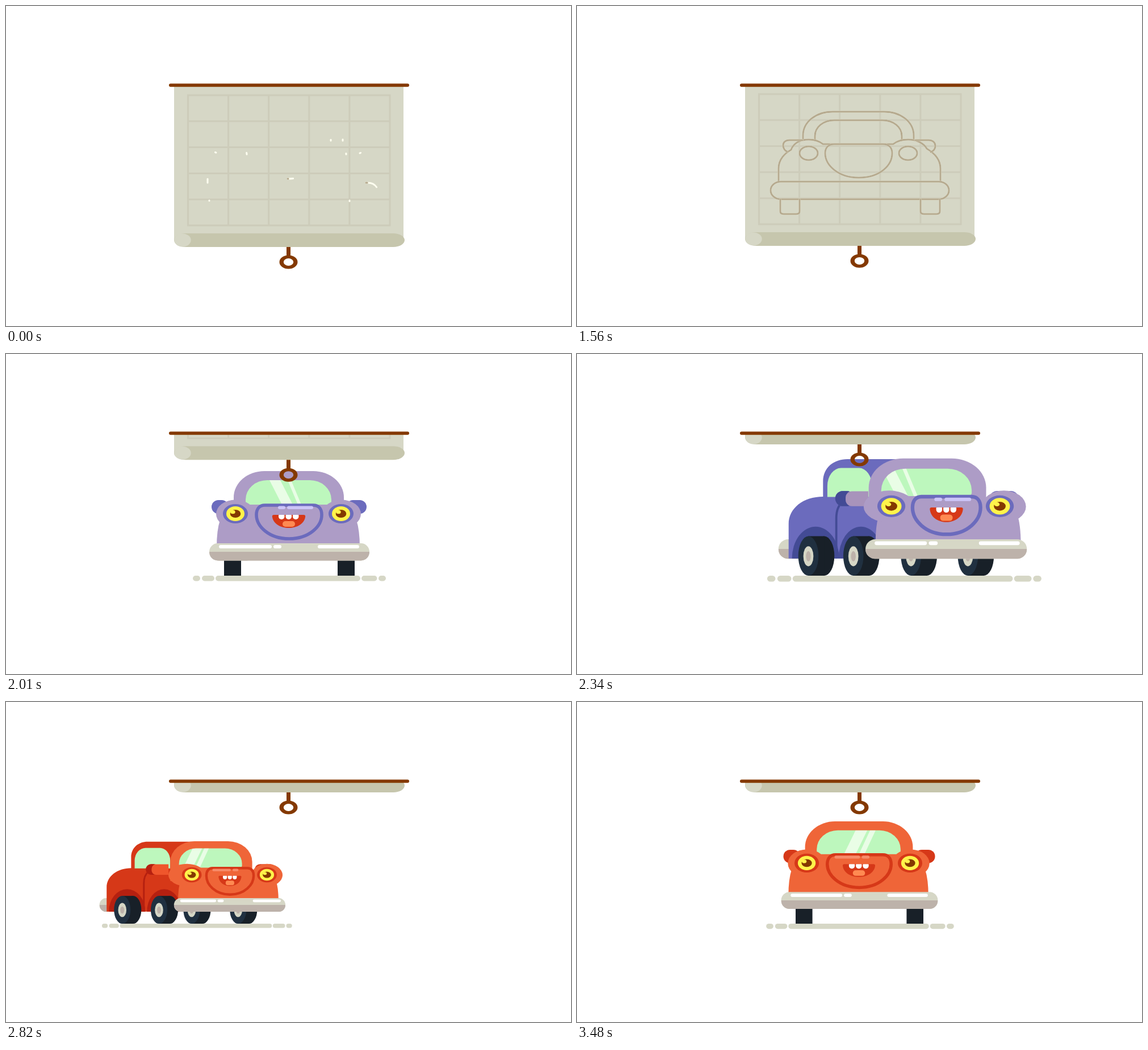
Write an HTML page with a canvas that moves like this. It is 995 px wide and 563 px high and loops after 3510 ms.

```html
<!DOCTYPE html>
<html lang="en">
<head>
<meta charset="utf-8">
<title>Car blueprint</title>
<style>
html, body { margin: 0; width: 100%; height: 100%; overflow: hidden; background: #fff; }
canvas { display: block; }
svg { position: absolute; top: 0; left: 0; }
</style>
</head>
<body>
<canvas id="stage" width="995" height="563"></canvas>
<svg width="0" height="0"><path id="probe"/></svg>
<script>
const LOOP = 3510;
const GROUND_Y = 390;
const ctx = document.getElementById('stage').getContext('2d');
const probe = document.getElementById('probe');

const BROWN = '#843900', PAPER = '#d6d7c6', ROLL = '#c6c6ad', GRID = '#cdccba';
const SKETCH = '#b5a98e', FRESH = '#fffff0';
const GLASS = '#bdf7bd', GLARE = '#e9fde6', CHROME = '#d6d7c6', SHADE = '#bdb2aa';
const TYRE = '#203040', TREAD = '#182028';

const clamp = u => Math.min(1, Math.max(0, u));
const progress = (t, from, to) => clamp((t - from) / (to - from));
const smooth = u => u * u * (3 - 2 * u);
const inOut = (u, n) => u < 0.5 ? Math.pow(2 * u, n) / 2 : 1 - Math.pow(2 - 2 * u, n) / 2;

function fill(color, build) {
  ctx.beginPath();
  build();
  ctx.fillStyle = color;
  ctx.fill();
}

function oval(color, x, y, rx, ry) {
  fill(color, () => ctx.ellipse(x, y, Math.max(0, rx), ry, 0, 0, Math.PI * 2));
}

// Rectangle by its edges; radii as for roundRect
function box(color, x0, y0, x1, y1, radii = 0) {
  fill(color, () => ctx.roundRect(x0, y0, x1 - x0, y1 - y0, radii));
}

const pill = (color, x0, y0, x1, y1) => box(color, x0, y0, x1, y1, (y1 - y0) / 2);

// ---- Blueprint ----

function sketch(delay, d) {
  probe.setAttribute('d', d);
  return { delay, path: new Path2D(d), length: probe.getTotalLength() };
}
const ring = x => `M${x + 16} 261A16 12 0 1 0 ${x - 16} 261A16 12 0 1 0 ${x + 16} 261`;
const tyre = x => `M${x} 342V363Q${x} 368 ${x + 6} 368H${x + 28}Q${x + 34} 368 ${x + 34} 363V342`;

const sketches = [
  sketch(120, 'M593 237V230C593 206 570 188 541 188H450C421 188 398 206 398 230V237'),
  sketch(120, 'M572 237V231C572 215 557 203 538 203H453C434 203 419 215 419 231V237'),
  sketch(60, 'M355 311V288C355 272 366 261 377 255C381 244 392 237 408 237C419 237 427 240 433 245' +
    'H557C563 240 571 237 583 237C599 237 611 244 616 253C628 260 640 270 640 288V311'),
  sketch(0, 'M496 304C534 304 555 282 555 261C555 251 549 245 539 245H453C443 245 437 251 437 261C437 282 460 304 496 304'),
  sketch(0, ring(408)),
  sketch(60, ring(583)),
  sketch(0, 'M370 258C366 257 363 252 363 247C363 242 367 238 374 238H397'),
  sketch(0, 'M623 259C628 257 631 253 631 248C631 242 626 238 619 238H596'),
  sketch(0, 'M634 311H637A18 15.5 0 0 1 637 342H359A18 15.5 0 0 1 359 311H634'),
  sketch(120, tyre(358)),
  sketch(60, tyre(605))
];

function drawSketch(s, t) {
  const trace = (color, lag) => {
    const drawn = s.length * inOut(progress(t - s.delay - lag, -338, 1362), 3);
    if (drawn < 0.7) return;
    ctx.setLineDash([drawn, s.length + 10]);
    ctx.strokeStyle = color;
    ctx.stroke(s.path);
  };
  trace(FRESH, 0);
  trace(SKETCH, 180);
}

function drawScreen(t) {
  const lift = 265 * inOut(progress(t, 1398, 2322), 4);
  ctx.save();
  ctx.beginPath();
  ctx.rect(0, 139, 995, 424);
  ctx.clip();
  ctx.translate(0, -lift);

  box(PAPER, 296, 139, 700, 412);
  ctx.lineWidth = 3;
  ctx.strokeStyle = GRID;
  ctx.beginPath();
  for (let i = 0; i <= 5; i++) {
    const x = 320.5 + i * 71.1, y = 157 + i * 45.8;
    ctx.moveTo(x, 155.5);
    ctx.lineTo(x, 387.5);
    ctx.moveTo(319, y);
    ctx.lineTo(677.5, y);
  }
  ctx.stroke();

  ctx.lineCap = 'round';
  for (const s of sketches) drawSketch(s, t);
  ctx.setLineDash([]);

  box(ROLL, 296, 400, 702, 424, { x: 20, y: 12 });
  oval(PAPER, 311, 412, 14.7, 11.5);
  box(BROWN, 494, 424, 501, 441);
  ctx.beginPath();
  ctx.ellipse(497.5, 450.5, 16, 12, 0, 0, Math.PI * 2);
  ctx.ellipse(497.5, 450.5, 8.7, 6.5, 0, 0, Math.PI * 2);
  ctx.fillStyle = BROWN;
  ctx.fill('evenodd');
  // The hole shows paper-white only where nothing lies behind
  ctx.restore();
  pill(BROWN, 287, 136.5, 710, 142.2);
}

// ---- Cars ----

const purple = {
  dark: '#6b6bbd', deep: '#434b95', light: '#ad9cc6', mirror: '#a893bb', shine: '#cdc5f8',
  faceShift: -9, glareShift: 0, tailGap: [29, 11],
  glare: [[-35, -16, 22], [-3, 3, 18]],
  shines: [[-20, -7, 88, 100], [-4, 42, 104, 144]]
};
const red = {
  dark: '#d63818', deep: '#b52010', light: '#ef6538', mirror: '#ef562c', shine: '#f78c6b',
  faceShift: 0, glareShift: 10, tailGap: [27, -15],
  glare: [[-7, 14, -21], [19, 29, -20]],
  shines: [[-45, 1, 69, 109], [4, 18, 113, 126]]
};

function drawEye(x, color) {
  oval(color, x, -109, 22, 17);
  oval('#fff34a', x, -109, 16, 13);
  oval(BROWN, x, -109, 9.3, 7);
  oval('#fff34a', x - 4.5, -112, 4.2, 3.2);
}

function drawMouth(x, width) {
  ctx.save();
  ctx.translate(x, 0);
  ctx.scale(width, 1);
  fill('#d63818', () => {
    ctx.moveTo(-26, -107);
    ctx.lineTo(26, -107);
    ctx.quadraticCurveTo(30, -107, 29, -103);
    ctx.bezierCurveTo(27, -91, 14, -84, 0, -84);
    ctx.bezierCurveTo(-14, -84, -27, -91, -29, -103);
    ctx.quadraticCurveTo(-30, -107, -26, -107);
  });
  for (const tooth of [-18, -5.5, 7]) box('#fff', tooth, -107, tooth + 10.5, -99, [1, 1, 5, 5]);
  box('#ff8a52', -11, -96, 11, -86, 5);
  ctx.restore();
}

// turn: 0 faces the viewer, 1 is the three-quarter view
function drawCar(c, x, size, turn) {
  const mix = (a, b) => a + (b - a) * turn;
  const face = c.faceShift * turn;

  function wheel(front, side) {
    const cx = mix(front, side), rx = mix(0, 23.4), depth = mix(30, 22.6);
    oval(TREAD, cx + depth, -31, rx, 31);
    box(TREAD, cx, -62, cx + depth, 0);
    oval(TYRE, cx, -31, rx, 31);
    oval(CHROME, cx, -30.5, rx * 0.5, 15.7);
    oval(SHADE, cx, -30.5, rx * 0.24, 8);
  }
  function bumper(x0, x1) {
    box(CHROME, x0, -57, x1, -26.5, 15);
    ctx.save();
    ctx.beginPath();
    ctx.rect(x0, -42, x1 - x0, 20);
    ctx.clip();
    box(SHADE, x0, -57, x1, -26.5, 15);
    ctx.restore();
  }
  function arch(cx, rx) {
    fill(c.deep, () => ctx.ellipse(cx, -27, rx, 50, 0, Math.PI, Math.PI * 2));
  }

  ctx.save();
  ctx.translate(x, GROUND_Y);
  ctx.scale(size, size);

  const tail = mix(-141, -226) - mix(...c.tailGap), nose = mix(141, 226) + mix(29, 11);
  pill(CHROME, tail, 0, tail + 13, 9.4);
  pill(CHROME, tail + 16, 0, tail + 38, 9.4);
  pill(CHROME, tail + 40, 0, nose - 45, 9.4);
  pill(CHROME, nose - 43, 0, nose - 15.5, 9.4);
  pill(CHROME, nose - 13, 0, nose, 9.4);

  // Side and rear
  wheel(85, -24.7);
  wheel(85, 107);
  bumper(mix(-138, -226), mix(-60, -150));
  const back = mix(-122, -210), cab = mix(-72, -154), inner = mix(0, 20), bend = mix(45, 35);
  fill(c.dark, () => {
    ctx.moveTo(back, -27);
    ctx.lineTo(back, -81);
    ctx.bezierCurveTo(back, -106, mix(-105, -184), -124, cab, -124);
    ctx.lineTo(cab, -148);
    ctx.bezierCurveTo(cab, -170, cab + bend * 0.45, -183, cab + bend, -183);
    ctx.lineTo(inner, -183);
    ctx.lineTo(inner, -27);
  });
  box(GLASS, mix(-72, -144), -169, mix(-60, -46.5), -123.5,
    [{ x: mix(4, 30), y: 28 }, { x: mix(4, 28), y: 28 }, 0, 0]);
  const door = mix(-98, -111);
  ctx.beginPath();
  ctx.moveTo(door + 10, -116);
  ctx.quadraticCurveTo(door, -108, door, -90);
  ctx.lineTo(door, -27);
  ctx.lineWidth = mix(1, 4.5);
  ctx.lineCap = 'butt';
  ctx.strokeStyle = c.deep;
  ctx.stroke();
  arch(mix(-100, -158), mix(14, 48));
  arch(mix(-100, -53), mix(14, 45));
  wheel(-115, -167.6);
  wheel(-115, -63.4);
  box(c.dark, mix(100, 150), -133, mix(136, 200), -109, 12);
  const mirror = mix(-137, -95);
  box(c.turned ? c.deep : c.dark, mirror, -133, mirror + 30, -109, 12);
  if (turn > 0.3) box(c.deep, mirror, -133, mirror + 30, -109, 12);
  box(c.mirror, mix(-100, -88.5), -132.5, mix(-78, -46.5), -109, [10, 0, 0, 10]);

  // Front shell
  box(c.light, mix(-98, -36), -184, mix(96, 144), -95, [{ x: 54, y: 46 }, { x: 54, y: 46 }, 0, 0]);
  const left = mix(-128, -6), right = mix(124, 211);
  fill(c.light, () => {
    ctx.moveTo(left, -50);
    ctx.quadraticCurveTo(left, -80, left + 6, -98);
    ctx.lineTo(right - 6, -98);
    ctx.quadraticCurveTo(right, -80, right, -50);
  });

  ctx.save();
  const corner = { x: 38, y: 34 };
  ctx.beginPath();
  ctx.roundRect(mix(-77, -17), -168, mix(151, 138), 43, [corner, corner, 5, 5]);
  ctx.fillStyle = GLASS;
  ctx.fill();
  ctx.clip();
  for (const [a, b, slant] of c.glare) {
    const dx = c.glareShift * turn;
    fill(GLARE, () => {
      ctx.moveTo(a + dx, -168);
      ctx.lineTo(b + dx, -168);
      ctx.lineTo(b + dx + slant, -125);
      ctx.lineTo(a + dx + slant, -125);
    });
  }
  ctx.restore();

  oval(c.light, mix(-95, 10), -108.5, mix(34, 43), 25);
  oval(c.light, mix(92, 187), -108.5, mix(34, 35), 25);

  // Face
  const mid = mix(-0.5, 107) + face, half = mix(57.5, 51.5);
  ctx.beginPath();
  ctx.moveTo(mid, -65);
  ctx.bezierCurveTo(mid + 0.62 * half, -65, mid + half, -87, mid + half, -107);
  ctx.bezierCurveTo(mid + half, -118, mid + 0.9 * half, -124, mid + 0.74 * half, -124);
  ctx.lineTo(mid - 0.74 * half, -124);
  ctx.bezierCurveTo(mid - 0.9 * half, -124, mid - half, -118, mid - half, -107);
  ctx.bezierCurveTo(mid - half, -87, mid - 0.62 * half, -65, mid, -65);
  ctx.closePath();
  ctx.fillStyle = c.light;
  ctx.fill();
  ctx.lineWidth = 5.6;
  ctx.strokeStyle = c.dark;
  ctx.stroke();
  for (const [a0, b0, a1, b1] of c.shines) pill(c.shine, mix(a0, a1) + face, -122.5, mix(b0, b1) + face, -117);
  drawMouth(mix(-1, 107) + face, mix(1, 0.84));
  drawEye(mix(-95, 24) + face, c.dark);
  drawEye(mix(91, 187) + face, c.dark);

  bumper(mix(-141, -14) + face, mix(141, 226) + face);
  for (const [a0, b0, a1, b1] of [[-124, -31, -1, 76], [-28, -14, 79, 93], [50, 123, 158, 218]]) {
    pill('#fff', mix(a0, a1) + face, -54, mix(b0, b1) + face, -48);
  }
  ctx.restore();
}

function drawPurple(t) {
  if (t < 1398 || t > 2900) return;
  const run = Math.max(0, t - 2126);
  drawCar(purple, 499 + 0.001674 * run * run,
    1 + 0.287 * smooth(progress(t, 2010, 2750)),
    smooth(progress(t, 2080, 2500)));
}

function drawRed(t) {
  if (t < 2250) return;
  const left = Math.max(0, 3252 - t), age = t - 2550;
  drawCar(red, 497.5 - 0.000912 * left * left,
    0.698 + 0.0003465 * age - 4.89e-8 * age * age,
    1 - smooth(progress(t, 2640, 3250)));
}

function render(now) {
  const t = now % LOOP;
  ctx.fillStyle = '#fff';
  ctx.fillRect(0, 0, 995, 563);
  drawRed(t);
  drawPurple(t);
  drawScreen(t);
}

const start = performance.now();
function tick() {
  render(performance.now() - start);
  requestAnimationFrame(tick);
}
tick();
</script>
</body>
</html>
```
